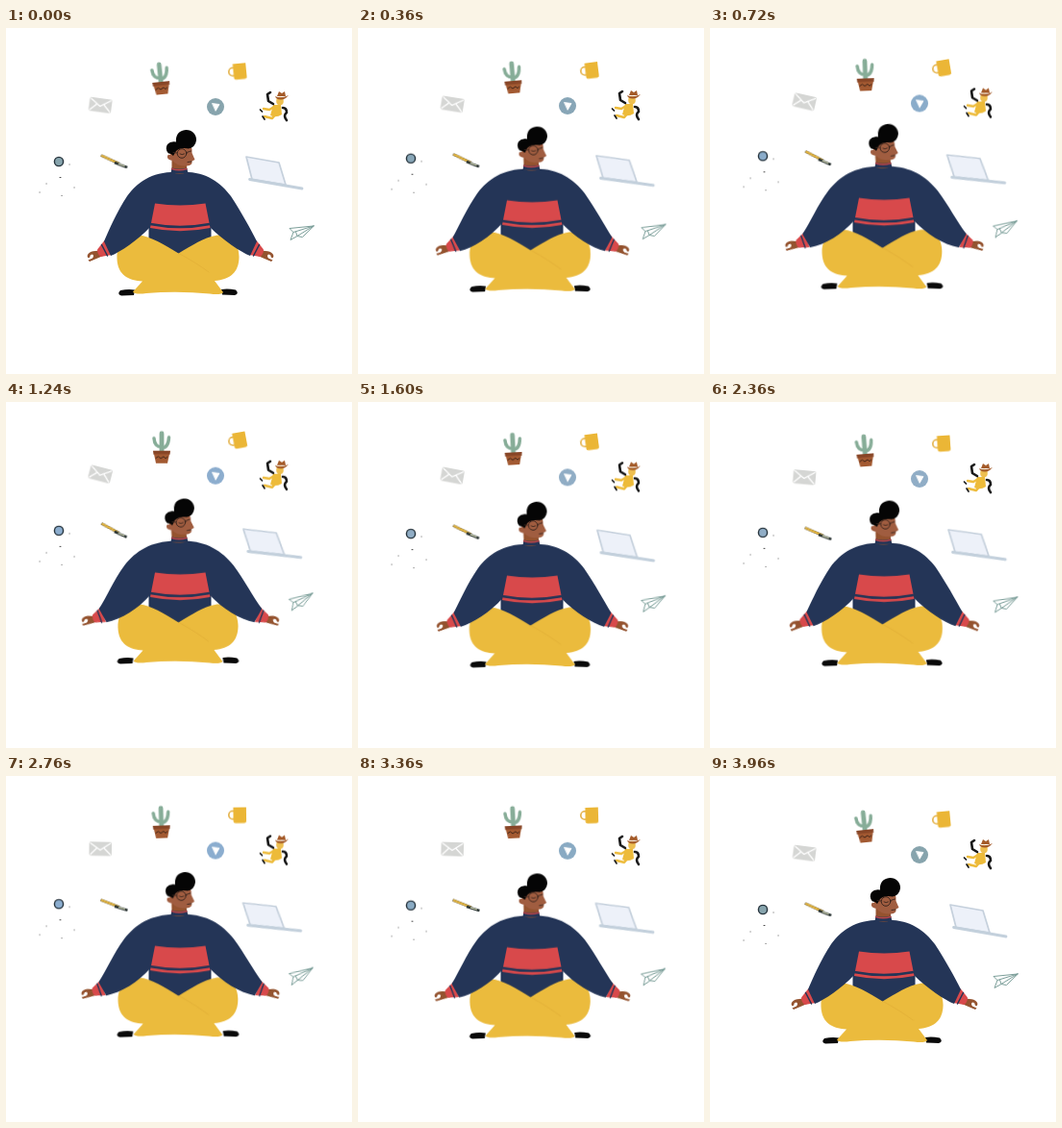
Animation of 360x360 px, one loop 4000 ms. Source, as an HTML page:

```html
<!DOCTYPE html>
<html lang="en">
<head>
<meta charset="utf-8">
<title>Floating meditation</title>
<style>
html, body { margin: 0; width: 100%; height: 100%; overflow: hidden; background: #fff; }
svg { display: block; width: 100vw; height: 100vh; }

/* Every part shares one 4 s cycle; the body breathes twice in it. */
svg * { animation: 4s infinite ease-in-out; }
.body { animation-name: bob; }
.feet { animation-name: lift; }
.foot { animation-name: spread; }
.knees { animation-name: knees; transform-origin: 179px 240px; }
.head { animation-name: nod; transform-origin: 181px 147px; }
.sleeve { animation-name: sleeve; fill: #243557; }
.right .sleeve { animation-name: sleeve-right; }
.cuff { animation-name: cuff; transform-origin: 104px 229px; }
.disc { animation-name: bob; }
.laptop { animation-name: laptop; transform-origin: 278px 150px; }
.float { animation-name: float; }
.tilt { animation-name: tilt; animation-timing-function: cubic-bezier(.36, 0, .64, 1); }
.mail { --turn: 7.5deg; transform-origin: 98px 80px; }
.mug { --turn: -5.5deg; transform-origin: 242px 45px; }
.pen { --turn: 4deg; transform-origin: 112px 138.5px; }
.cactus { animation-name: sway; transform-origin: 162px 64px; }
.plane { animation-name: plane; transform-origin: 306px 213px; }
.tint { animation-name: tint; }

@keyframes bob {
  0%, 50%, 100% { transform: none; animation-timing-function: cubic-bezier(.4, 0, .2, 1); }
  24.5%, 75% { transform: translateY(-6px); }
}
@keyframes lift {
  0%, 50%, 100% { transform: none; animation-timing-function: cubic-bezier(.4, 0, .2, 1); }
  24.5%, 75% { transform: translateY(-1px); }
}
@keyframes spread {
  0%, 50%, 100% { transform: none; animation-timing-function: cubic-bezier(.4, 0, .2, 1); }
  24.5%, 75% { transform: translateX(-1.7px); }
}
@keyframes knees {
  0%, 50%, 100% { transform: none; animation-timing-function: cubic-bezier(.4, 0, .2, 1); }
  24.5%, 75% { transform: scaleX(.982); }
}
@keyframes nod {
  0%, 99%, 100% { transform: none; }
  18%, 31% { transform: rotate(-4deg); }
  49% { transform: rotate(-1.5deg); }
  69%, 84% { transform: rotate(-2deg); }
}
@keyframes sleeve {
  0%, 53%, 99%, 100% {
    d: path("M183 150C153 148 137 160 126 175C115 192 108 208 102 222L109 237C119 233 137 221 150 207L183 207Z");
    animation-timing-function: cubic-bezier(.4, 0, .2, 1);
  }
  24%, 76% {
    d: path("M183 150C153 148 136 159 123 175C111 191 105 207 96 220L104 234C120 231 138 220 150 206L183 207Z");
  }
}
@keyframes sleeve-right {
  0%, 53%, 99%, 100% {
    d: path("M183 150C157 148 140 160 129 175C118 192 109 208 102 222L109 237C119 233 137 221 151 207L183 207Z");
    animation-timing-function: cubic-bezier(.4, 0, .2, 1);
  }
  24%, 76% {
    d: path("M183 150C157 148 139 159 126 175C114 191 106 207 96 220L104 234C120 231 138 220 151 206L183 207Z");
  }
}
@keyframes cuff {
  0%, 53%, 99%, 100% { transform: none; animation-timing-function: cubic-bezier(.4, 0, .2, 1); }
  24%, 76% { transform: translate(-5.5px, -3px) rotate(9deg); }
}
@keyframes laptop {
  0%, 50%, 100% { transform: none; animation-timing-function: cubic-bezier(.4, 0, .2, 1); }
  24.5%, 75% { transform: translate(-2.5px, -4px) rotate(-4deg); }
}
@keyframes float {
  0%, 99%, 100% { transform: none; }
  30%, 77% { transform: translateY(-5.3px); }
  52% { transform: translateY(-1.3px); }
}
@keyframes tilt {
  0%, 50%, 100% { transform: rotate(var(--turn)); }
  27% { transform: rotate(calc(var(--turn) * 2)); }
  75% { transform: none; }
}
@keyframes sway {
  0%, 49%, 99%, 100% { transform: rotate(-6deg); }
  31% { transform: rotate(0deg); }
  75% { transform: rotate(-1.5deg); }
}
@keyframes plane {
  0%, 99%, 100% { transform: none; }
  28%, 76% { transform: translateY(-5px) rotate(-9deg); }
  51% { transform: translateY(-1.3px) rotate(-2deg); }
}
@keyframes tint {
  0%, 100% { fill: #87a4ad; }
  25%, 72% { fill: #8badd0; }
  50% { fill: #93adc0; }
}
</style>
</head>
<body>
<svg viewBox="0 0 360 360" fill="none" stroke-linecap="round" stroke-linejoin="round">
  <g class="float">
    <g class="cactus">
      <g stroke="#87ad98" stroke-width="3.500">
        <path d="M162 57V38" stroke-width="4.800"/>
        <path d="M162 52Q154.500 52 154 43M162 53Q169 53 169.500 42"/>
      </g>
      <path d="M153 56H171L170.500 60H153.500Z" fill="#874526"/>
      <path d="M154 59.500H170L168 69H156Z" fill="#a35a32"/>
      <path d="M156 63.500L158.500 62L161 64L164 62L166 64L168 62.500" stroke="#3f2418"/>
    </g>

    <g class="tilt mail">
      <rect x="86.500" y="73" width="23.500" height="14.500" rx="2" fill="#d5d6d4"/>
      <path d="M88 74.500L98 81.500L108.500 74.500M88 86L94.500 79.500M108.500 86L102 79.500" stroke="#fff" stroke-width="1.300"/>
    </g>

    <g class="tilt mug">
      <circle cx="236" cy="45" r="4.200" stroke="#e3b044" stroke-width="1.600"/>
      <path d="M236.500 37H250V51Q250 53.500 247.500 53.500H239Q236.500 53.500 236.500 51Z" fill="#ebb636"/>
    </g>

    <circle class="tint" cx="218" cy="82" r="9"/>
    <path d="M214.800 78.500L222 79.500L218.300 86Z" fill="#fff" stroke="#fff" stroke-width=".8"/>

    <g class="tilt pen" stroke-linecap="butt">
      <path d="M98.500 133.500L118 140.700" stroke="#6b5a2c" stroke-width="2.800"/>
      <path d="M99 133.700L117 140.300" stroke="#e9b942" stroke-width="1.900"/>
      <path d="M113 139.900L126.500 144" stroke="#26302f" stroke-width="2.600"/>
      <path d="M117 140.900L124 143" stroke="#d3d6b4" stroke-width="1.200"/>
    </g>

    <g>
      <path d="M279 82L274 85L268 84M282 88L277 94L269 92" stroke="#edbb3a" stroke-width="2.400"/>
      <path d="M278 80H286L287 90Q281 94 275 91Z" fill="#edbb3a"/>
      <ellipse cx="285" cy="76" rx="3.800" ry="4.300" fill="#eebf50"/>
      <path d="M280 71Q286 74 294 70L291 73Q286 76 281 73ZM282 71L284 66L287 68L290 66L291 71Z" fill="#a45b2a"/>
      <path d="M275 67L272 69L273 76L278 79M288 83Q292 83 292 88Q288 91 292 96" stroke="#171717" stroke-width="2.600"/>
      <path d="M264.500 85L266.500 87M267 92L269 95" stroke="#171717" stroke-width="1.700"/>
    </g>
  </g>

  <g class="disc">
    <circle cx="55" cy="139" r="5.300" fill="#27343d"/>
    <circle class="tint" cx="55" cy="139" r="3.900"/>
    <path d="M42 162h.1M56 155.500h1M71 166h.1M58 174.500h.1M66 142h.1M35 171h.1" stroke="#333" stroke-width=".9"/>
  </g>

  <g class="laptop">
    <path d="M250 134L284 140L291 163L256 157.500Z" fill="#edf1f9" stroke="#c5d0dc" stroke-width="1.700"/>
    <path d="M253.500 157.500L308 167" stroke="#c3d0dc" stroke-width="2.800"/>
  </g>

  <path class="plane" d="M320 206L295 208.500L299 212.500L296 220.500L303 216.500L308 217.500ZM320 206L299 212.500M320 206L303 216.500L301.500 212" stroke="#7b9e99" stroke-width="1"/>

  <g class="body">
    <path d="M148.500 203V226L181 240L213.500 226V203Z" fill="#243557"/>

    <g class="feet">
      <g class="foot">
        <path d="M119 273Q127 271.500 134 272.500L133 278Q126 278 120 278.500Q115 277 119 273Z" fill="#090909"/>
      </g>
      <g transform="matrix(-1 0 0 1 358 0)">
        <g class="foot">
          <path d="M119 272.500Q127 271 134 272L133 277.500Q126 277.500 120 278Q115 276.500 119 272.500Z" fill="#090909"/>
        </g>
      </g>
    </g>
    <g class="knees">
      <path d="M179.500 234.500C164 225 151 217 138 215.500C123 214 115 226 115.500 240C116 257 128 263 142 263.500L132 274.500Q134 277.500 146 276Q179 273.500 212 276.500Q224 278 226 275L217 263C234 261.500 242 254 242.500 239C243 223 232 213.500 218 216C206 218 194 226 179.500 234.500Z" fill="#ebbb3d"/>
      <path d="M180 234.500Q199 245 211 254" stroke="#e2b038" stroke-width=".8"/>
    </g>

    <g id="left">
      <g class="cuff">
        <path d="M101 231L93 232Q88 232 85.500 235Q83.500 238 86 239.500L87.500 238Q87 235.500 90 235.500Q92 237 90 239.500L85.500 241.500L87 243L94 240L101 237Z" fill="#94532f"/>
        <path d="M102.500 221L110 236L98.500 238Q95 235 95 230.500Z" fill="#d8494b"/>
        <path d="M99.500 225.500L105.500 237" stroke="#243557" stroke-width="1.500"/>
      </g>
      <path class="sleeve"/>
    </g>
    <g id="right" class="right" transform="matrix(-1 0 0 1 363 0)"></g>

    <path d="M155 182.500Q181 186.500 207.500 182.500L212.500 208Q181 214.500 150 208Z" fill="#d8494b"/>
    <path d="M150 204Q181 210 212 204" stroke="#243557" stroke-width="2.400" stroke-linecap="butt"/>

    <g class="head">
      <path d="M172.500 138H187.500L188.500 150Q181 153 172.500 150Z" fill="#95532f"/>
      <path d="M170 126L192 121Q194 126 193.500 130L196.500 137L193.500 138.500Q194 143 188.500 143.500Q178 144 173 138Q167 137 168 133Q169 131 171 132Z" fill="#a05d40"/>
      <path d="M169 130.500Q165 126 168 121Q171 117.500 177 118.500C176 110 182 106 187.500 106C194 106 198.500 111 198 117Q197 124 190 125.500Q181 124 177 128L174 133Q172 130 169 130.500Z" fill="#050505"/>
      <circle cx="183" cy="130.500" r="4.800" stroke="#3a251d"/>
      <path d="M188 129.500L192.500 128M178 130L174 129.500M181 131Q183 132.500 185.500 131M189 139.500L193 139" stroke="#3a251d" stroke-width=".9"/>
    </g>
    <path d="M172.500 145.500Q180 148 188 145.500L189.500 151H171.500Z" fill="#243557"/>
    <path d="M172.500 146.500Q180 149 188 146.500" stroke="#b9454a" stroke-width="1.400"/>
  </g>
</svg>
<script>
// The right arm mirrors the left one's parts.
const [left, right] = ["left", "right"].map(id => document.getElementById(id));
for (const part of left.children) right.append(part.cloneNode(true));
</script>
</body>
</html>
```
